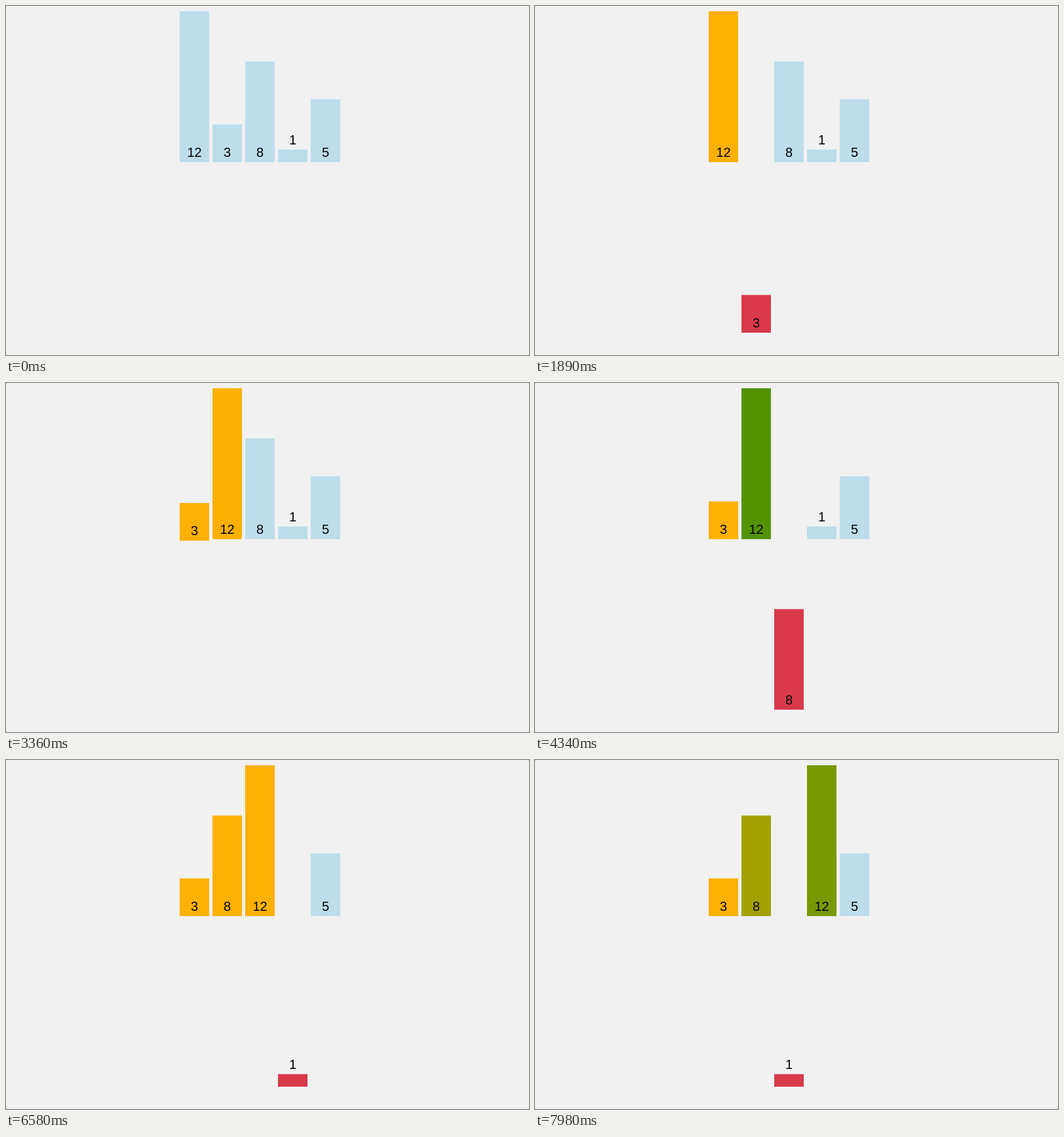
Recreate the animation shown at these times as an HTML page. Size 798 by 532 pixels, loop 8 s.

```html
<!DOCTYPE html>
<html lang="en">
<head>
<meta charset="utf-8">
<title>Insertion sort</title>
<style>
  html, body { margin: 0; width: 100%; height: 100%; overflow: hidden; background: #a8a8a8; }
  svg { display: block; width: 798px; height: 532px; border-radius: 2px; background: #f1f1f1; }
  text { font: 20px "Liberation Sans", Arial, sans-serif; text-anchor: middle; fill: #000; }
</style>
</head>
<body>
<svg id="stage" viewBox="0 0 798 532"></svg>
<script>
const LOOP = 8000, TICK = 70, MOVE = 300;
const UNIT = 230 / 12, SLOT = 50, LEFT = 265, BASE = 238, DROP = 260;
const BLUE = [189, 221, 235], ORANGE = [253, 177, 4], GREEN = [30, 137, 4], RED = [217, 57, 74];

// Each step: start time, then the new properties of the bars it affects, keyed by value.
const steps = [
  [1050, { 12: { fill: ORANGE } }],
  [1570, { 3: { fill: RED, y: DROP } }],
  [2090, { 12: { fill: GREEN } }],
  [2600, { 12: { slot: 1 }, 3: { slot: 0 } }],
  [3100, { 12: { fill: ORANGE }, 3: { fill: ORANGE, y: 0 } }],
  [3630, { 8: { fill: RED, y: DROP } }],
  [4158, { 12: { fill: GREEN } }],
  [4690, { 12: { slot: 2 }, 8: { slot: 1 } }],
  [5247, { 12: { fill: ORANGE }, 3: { fill: GREEN } }],
  [5730, { 3: { fill: ORANGE }, 8: { fill: ORANGE, y: 0 } }],
  [6288, { 1: { fill: RED, y: DROP } }],
  [6820, { 12: { fill: GREEN } }],
  [7345, { 12: { slot: 3 }, 1: { slot: 2 } }],
  [7840, { 12: { fill: ORANGE }, 8: { fill: GREEN } }]
];

const stage = document.getElementById("stage");

function add(parent, tag, attributes) {
  const node = document.createElementNS("http://www.w3.org/2000/svg", tag);
  for (const name in attributes) node.setAttribute(name, attributes[name]);
  return parent.appendChild(node);
}

const bars = [12, 3, 8, 1, 5].map((value, slot) => {
  const group = add(stage, "g", {});
  const height = value * UNIT;
  const rect = add(group, "rect", { y: BASE - height, width: 45, height });
  const labelY = value === 1 ? BASE - height - 8 : BASE - 8;
  add(group, "text", { x: 22.5, y: labelY }).textContent = value;
  return { value, slot, group, rect };
});

const ease = t => t < 0.5 ? 4 * t ** 3 : 1 - 4 * (1 - t) ** 3;
const mix = (a, b, p) => Array.isArray(a) ? a.map((v, i) => mix(v, b[i], p)) : a + (b - a) * p;

function draw(time) {
  for (const bar of bars) {
    const pose = { slot: bar.slot, y: 0, fill: BLUE };
    for (const [start, changes] of steps) {
      const p = ease(Math.min(1, Math.max(0, (time - start) / MOVE)));
      const change = changes[bar.value];
      for (const key in change) pose[key] = mix(pose[key], change[key], p);
    }
    bar.group.setAttribute("transform", `translate(${LEFT + pose.slot * SLOT} ${pose.y})`);
    bar.rect.setAttribute("fill", `rgb(${pose.fill.map(Math.round)})`);
  }
}

const begin = performance.now();
function frame() {
  const time = (performance.now() - begin) % LOOP;
  draw(Math.floor(time / TICK) * TICK);
  requestAnimationFrame(frame);
}
frame();
</script>
</body>
</html>
```
